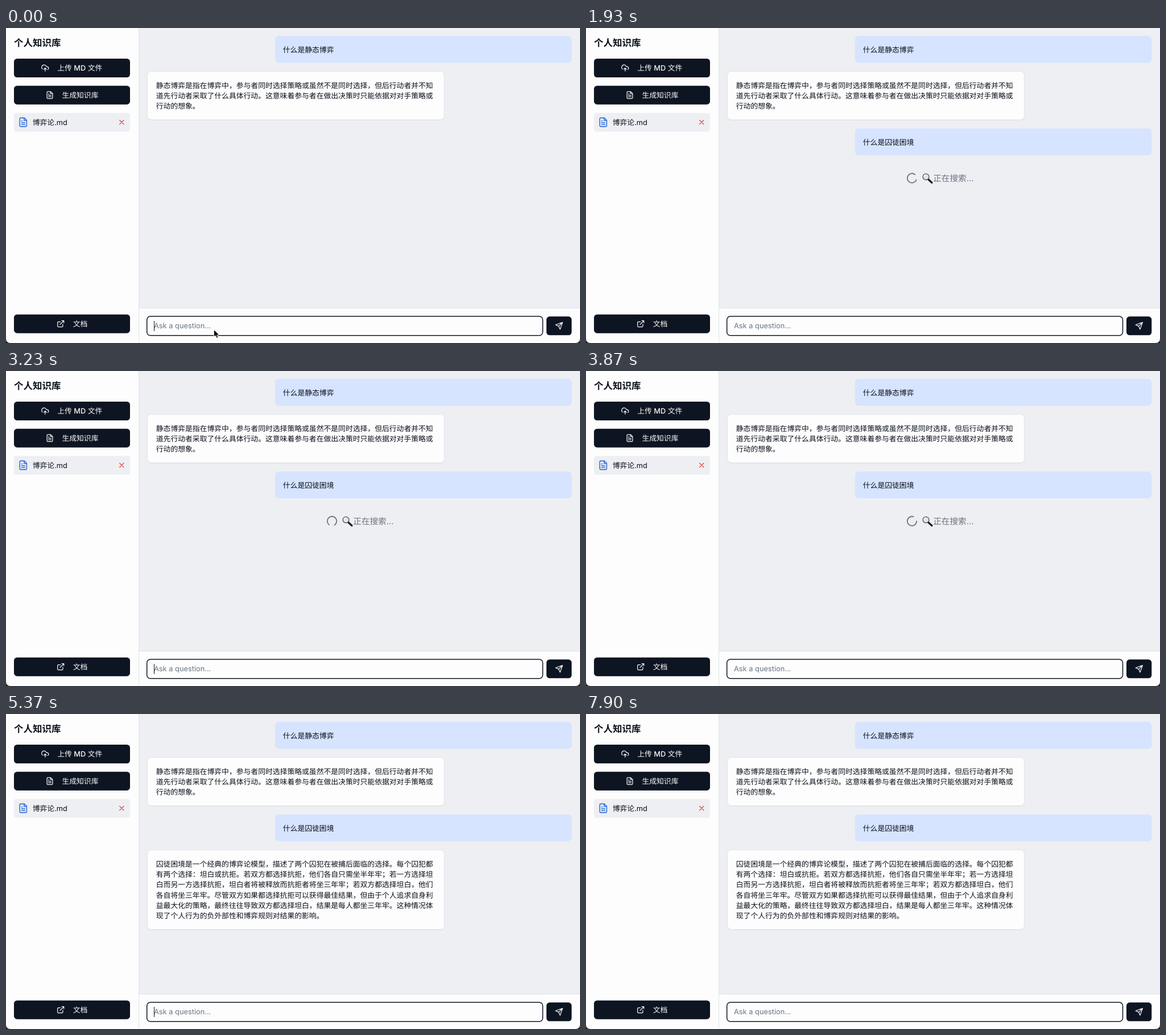
An HTML page that plays this animation: 1009 by 555 pixels, repeating every 8 s.

```html
<!DOCTYPE html>
<html lang="zh-CN">
<head>
<meta charset="utf-8">
<title>个人知识库</title>
<style>
  html, body { margin: 0; width: 100%; height: 100%; overflow: hidden; background: #eeeff3; }
  svg { display: block; width: 100%; height: 100%; }
  text {
    font: 12.82px Inter, "Noto Sans CJK SC", "Noto Sans CJK", sans-serif;
    fill: #0b101b; text-rendering: geometricPrecision; white-space: pre;
  }
  .title { font-size: 16.48px; font-weight: 600; }
  .on-dark { fill: #fafafa; font-weight: 500; }
  .hint { fill: #697586; }
  .status { font-size: 14.65px; fill: #6b7280; }
  .dark { fill: #0e1522; }
  .icon { fill: none; stroke-width: 2; stroke-linecap: round; stroke-linejoin: round; }
  .paper { fill: #fdfdfd; }
  .rule { fill: #dfe2e8; }
</style>
</head>
<body>
<svg id="stage" viewBox="0 0 1009 555" xmlns="http://www.w3.org/2000/svg"></svg>
<script>
const LOOP = 8000;
const CLICK = 100, PASTE = 1100, SEND = 1870, ANSWER = 4950;
const BLINK = 500, SPIN = 1000;
const LINE = 18.32;

const ICONS = {
  upload: 'M4 14.9A7 7 0 1 1 15.71 8h1.79a4.5 4.5 0 0 1 2.5 8.24M12 12v9M16 16l-4-4-4 4',
  file: 'M14.5 2H6a2 2 0 0 0-2 2v16a2 2 0 0 0 2 2h12a2 2 0 0 0 2-2V7.5zM14 2v6h6M16 13H8M16 17H8M10 9H8',
  link: 'M15 3h6v6M10 14 21 3M18 13v6a2 2 0 0 1-2 2H5a2 2 0 0 1-2-2V8a2 2 0 0 1 2-2h6',
  close: 'M18 6 6 18M6 6l12 12',
  send: 'm22 2-7 20-4-9-9-4zM22 2 11 13',
  loader: 'M21 12a9 9 0 1 1-6.219-8.56'
};

const QUESTION = '什么是囚徒困境';
const REPLY_1 = [
  '静态博弈是指在博弈中，参与者同时选择策略或虽然不是同时选择，但后行动者并不知',
  '道先行动者采取了什么具体行动。这意味着参与者在做出决策时只能依据对对手策略或',
  '行动的想象。'
];
const REPLY_2 = [
  '囚徒困境是一个经典的博弈论模型，描述了两个囚犯在被捕后面临的选择。每个囚犯都',
  '有两个选择：坦白或抗拒。若双方都选择抗拒，他们各自只需坐半年牢；若一方选择坦',
  '白而另一方选择抗拒，坦白者将被释放而抗拒者将坐三年牢；若双方都选择坦白，他们',
  '各自将坐三年牢。尽管双方如果都选择抗拒可以获得最佳结果，但由于个人追求自身利',
  '益最大化的策略，最终往往导致双方都选择坦白，结果是每人都坐三年牢。这种情况体',
  '现了个人行为的负外部性和博弈规则对结果的影响。'
];

const text = (x, y, s, cls = '') => `<text x="${x}" y="${y}" class="${cls}">${s}</text>`;
const rect = (x, y, w, h, r, attrs) =>
  `<rect x="${x}" y="${y}" width="${w}" height="${h}" rx="${r}" ${attrs}/>`;
const icon = (name, cx, cy, size, color) =>
  `<path class="icon" stroke="${color}" d="${ICONS[name]}"
    transform="translate(${cx} ${cy}) scale(${size / 24}) translate(-12 -12)"/>`;
const button = (y, iconName, iconX, label, labelX) =>
  rect(14, y, 204, 33, 5.5, 'class="dark"') +
  icon(iconName, iconX, y + 16.5, 14.65, '#fafafa') +
  text(labelX, y + 21.4, label, 'on-dark');
const ask = (y, s) =>
  rect(472.7, y, 521.7, 47.5, 7, 'fill="#d6e4ff"') + text(486.8, y + 28.9, s);
const reply = (y, lines) => {
  const h = lines.length * LINE + 30.2;
  return rect(248.5, y + 1.2, 522, h, 7, 'fill="#000" opacity=".06"') +
    rect(248.5, y, 522, h, 7, 'fill="#fdfdfd" stroke="#e0e4ea"') +
    lines.map((s, i) => text(263.8, (y + 29.1 + i * LINE).toFixed(2), s)).join('');
};

const sidebar =
  rect(0, 0, 233, 555, 0, 'class="paper"') + rect(233, 0, 1, 555, 0, 'class="rule"') +
  text(14, 32.3, '个人知识库', 'title') +
  button(54, 'upload', 68.8, '上传 MD 文件', 90.3) +
  button(101.7, 'file', 77, '生成知识库', 98.4) +
  rect(14, 149.7, 204, 33, 4, 'fill="#eeeff3"') +
  icon('file', 30.3, 166, 18.3, '#2f6ddb') +
  text(46.7, 170.6, '博弈论.md') +
  icon('close', 203.3, 166, 14.65, '#d0312f') +
  button(504.7, 'link', 96.2, '文档', 117.8);

const composer =
  rect(234, 493, 775, 62, 0, 'class="paper"') + rect(234, 493, 775, 1, 0, 'class="rule"') +
  rect(247.7, 508, 695.8, 33.8, 6, 'fill="#fdfdfd" stroke="#0e1522" stroke-width="1.5"') +
  rect(950, 508.3, 44.3, 33, 5.5, 'class="dark"') +
  icon('send', 972.2, 524.8, 14.65, '#fafafa') +
  `<g id="hint">${text(260, 529.3, 'Ask a question...', 'hint')}</g>
   <g id="typed">${text(260, 529.6, QUESTION)}</g>
   <rect id="caret" y="516" width="1" height="18" class="dark"/>`;

const loading = `<g id="loading">
  <g id="spinner">${icon('loader', 0, 0, 22, '#6b7280')}</g>
  <path d="M601.5 266.5l6.5 6" stroke="#17191d" stroke-width="3.2" stroke-linecap="round"/>
  <circle cx="597.6" cy="262.2" r="5.4" fill="#dfe6ea" stroke="#4b4f55" stroke-width="1.3"/>
  <path d="M594.3 261.8a3.4 3.4 0 0 1 3-3" fill="none" stroke="#fff" stroke-width="1.2"/>
  ${text(610.2, 270.2, '正在搜索...', 'status')}
</g>`;

const pointers = `
  <path id="arrow" d="M365.4 531.4v13.2l3-2.8 2.1 4.7 2.3-1-2-4.6h4.2z"
    fill="#000" stroke="#fff" stroke-width="1" stroke-linejoin="round"/>
  <g id="beam" fill="none" stroke-linecap="round">
    ${[['#fff', 2.6], ['#111', 1.2]].map(([color, width]) =>
      `<path d="M361.6 524.8q2.9 0 2.9 2v9.8q0 2-2.9 2M367.4 524.8q-2.9 0-2.9 2v9.8q0 2 2.9 2M363 533.6h3"
        stroke="${color}" stroke-width="${width}"/>`).join('')}
  </g>`;

const corners = '<path d="M0 547q0 8 8 8H0zM1009 547q0 8-8 8h8z" fill="#14161a"/>';

document.getElementById('stage').innerHTML =
  rect(0, 0, 1009, 555, 0, 'fill="#eeeff3"') + sidebar +
  ask(13.7, '什么是静态博弈') + reply(76.5, REPLY_1) +
  `<g id="sent">${ask(176.9, QUESTION)}</g>` + loading +
  `<g id="answer">${reply(239.5, REPLY_2)}</g>` +
  composer + pointers + corners;

const part = Object.fromEntries(
  [...document.querySelectorAll('g[id], rect[id], path[id]')].map(el => [el.id, el]));
const show = (name, on) => part[name].setAttribute('visibility', on ? 'visible' : 'hidden');

function draw(t) {
  const filled = t >= PASTE && t < SEND;
  show('hint', !filled);
  show('typed', filled);
  show('sent', t >= SEND);
  show('loading', t >= SEND && t < ANSWER);
  show('answer', t >= ANSWER);
  show('arrow', t < CLICK);
  show('beam', t >= CLICK && t < SEND);
  show('caret', t < CLICK || Math.floor((t - CLICK) / BLINK) % 2 === 0);
  part.caret.setAttribute('x', filled ? 350 : 260);
  const angle = ((t - SEND + LOOP) % SPIN) / SPIN * 360;
  part.spinner.setAttribute('transform', `translate(573 264.5) rotate(${angle})`);
}

const start = performance.now();
function tick() {
  draw((performance.now() - start) % LOOP);
  requestAnimationFrame(tick);
}
tick();
</script>
</body>
</html>
```
